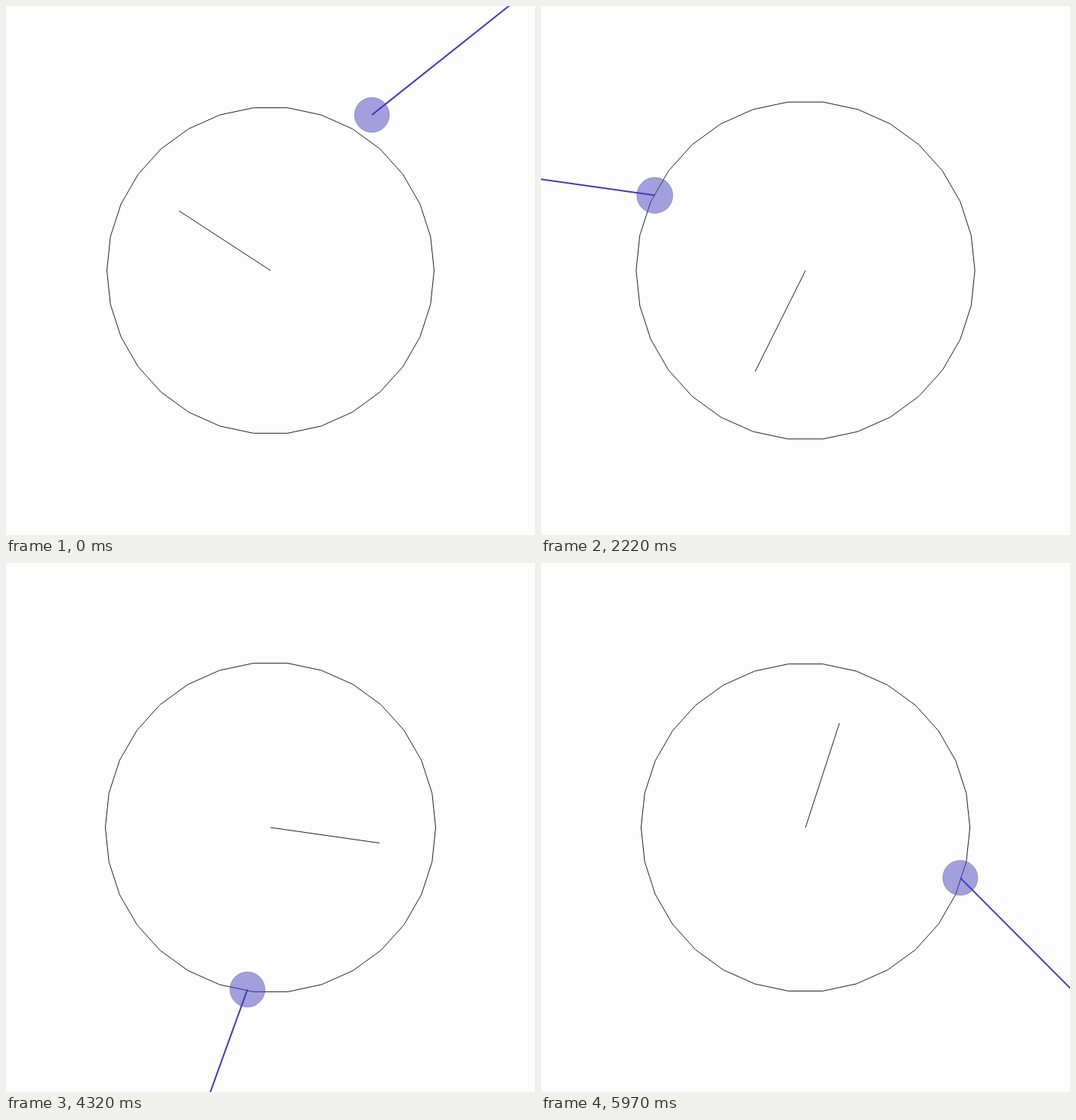
Write an HTML page with a canvas that moves like this. It is 700x700 px and loops after 6 s.

```html
<!DOCTYPE html>
<html lang="en">
<head>
<meta charset="utf-8">
<title>Orbiting ball with a swinging arm</title>
<style>
  html, body { margin: 0; width: 100%; height: 100%; overflow: hidden; background: #fdfdfd; }
  canvas { display: block; width: 700px; height: 700px; }
</style>
</head>
<body>
<canvas id="stage" width="700" height="700"></canvas>
<script>
// Times are in seconds, angles in degrees, lengths in pixels.
const LOOP = 6, FPS = 100 / 3, SIDES = 30, SIZE = 700;
const CENTER = [SIZE / 2, SIZE / 2];
const BACK = '#fdfdfd', INK = '#222', ARM = '#4839b6';
const ctx = document.getElementById('stage').getContext('2d');

// Beats [time, strength] that enlarge the whole scene.
const BEATS = [[0, 3], [1.9, 40], [3.2, 6.7], [3.66, 41], [4.55, 7], [5.42, 40]];

// Turning points [time, angle] of the arm, measured from the outward direction.
const TURNS = [
  [0, 18.4], [0.74, -29.3], [1.1, 58], [2.25, -18.6], [2.62, 62],
  [3.23, 71], [3.84, -53.2], [4.15, 25], [5.61, -375], [5.97, -332.9]
];

// The ball accelerates evenly from rest, then slowly loses speed.
function orbit(t) {
  const speed = 56.98, drag = 0.82, lag = 25.86;
  const rampTime = 2 * lag / speed;
  const ramp = Math.max(0, 1 - t / rampTime);
  return -31.04 - speed * t + drag * t * t - lag * ramp * ramp;
}

// The ball starts outside the ring and settles onto it.
function orbitScale(t) {
  return 0.987 + 0.148 / (1 + 9 * t);
}

// Each beat swells quickly and fades a little more slowly.
function ringRadius(t) {
  return BEATS.reduce((sum, [at, strength]) => {
    const dt = t - at;
    return sum + strength * Math.exp(dt < 0 ? dt / 0.2 : -dt / 0.24);
  }, 213.5);
}

function swing(t) {
  const next = Math.max(1, TURNS.findIndex(turn => turn[0] >= t));
  const [t0, a0] = TURNS[next - 1], [t1, a1] = TURNS[next];
  const ease = (1 - Math.cos(Math.PI * (t - t0) / (t1 - t0))) / 2;
  return a0 + (a1 - a0) * ease;
}

function polar([x, y], degrees, length) {
  const a = degrees * Math.PI / 180;
  return [x + length * Math.cos(a), y + length * Math.sin(a)];
}

function stroke(color, width) {
  ctx.strokeStyle = color;
  ctx.lineWidth = width;
  ctx.stroke();
}

function line(from, degrees, length, color, width) {
  ctx.beginPath();
  ctx.moveTo(...from);
  ctx.lineTo(...polar(from, degrees, length));
  stroke(color, width);
}

function draw(t) {
  const radius = ringRadius(t), angle = orbit(t);
  const ball = polar(CENTER, angle, radius * orbitScale(t));

  ctx.fillStyle = BACK;
  ctx.fillRect(0, 0, SIZE, SIZE);

  ctx.beginPath();
  for (let i = 0; i < SIDES; i++) ctx.lineTo(...polar(CENTER, i * 360 / SIDES, radius));
  ctx.closePath();
  stroke(INK, 1);

  line(CENTER, angle - 90, radius * 2 / 3, INK, 1);

  ctx.beginPath();
  ctx.arc(...ball, radius * 0.1065, 0, Math.PI * 2);
  ctx.fillStyle = 'rgba(75, 65, 190, 0.5)';
  ctx.fill();
  stroke('rgba(40, 40, 60, 0.35)', 0.8);

  line(ball, angle + swing(t), radius * 1.1775, ARM, 2);
}

const start = performance.now();
function tick() {
  const t = (performance.now() - start) / 1000 % LOOP;
  draw(Math.floor(t * FPS + 1e-6) / FPS);
  requestAnimationFrame(tick);
}
tick();
</script>
</body>
</html>
```
